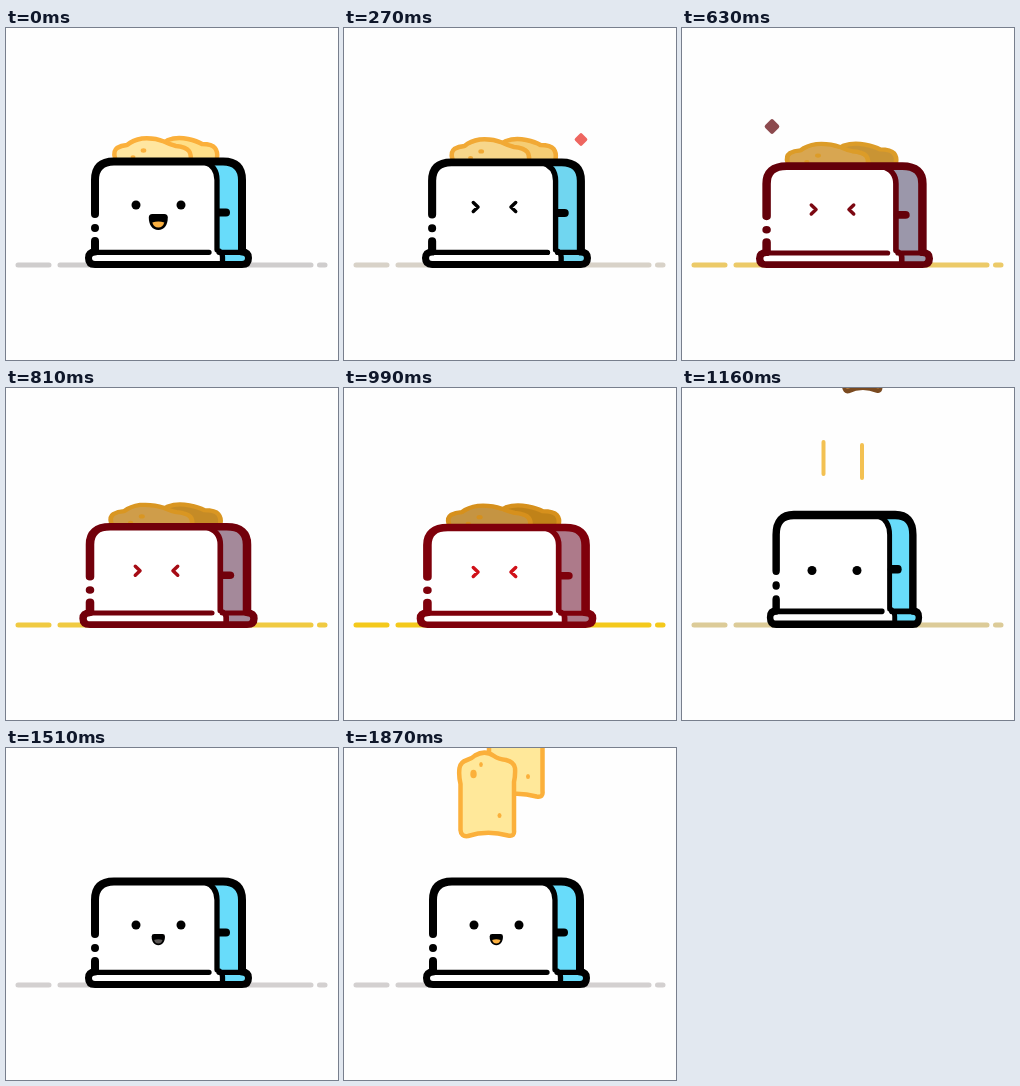
Write an HTML page that moves like this. It is 332 px wide and 332 px high and loops after 1.96 s.

```html
<!DOCTYPE html>
<html lang="en">
<head>
<meta charset="utf-8">
<title>Toaster</title>
<style>
html, body { margin: 0; width: 100%; height: 100%; overflow: hidden; background: #fefefe; }
svg { display: block; width: 100%; height: 100%; }
.line { fill: none; stroke-linecap: round; stroke-linejoin: round; }
</style>
</head>
<body>
<svg viewBox="0 0 332 332">
  <defs>
    <g id="slice">
      <path d="M116.500 82V36Q114.500 27 115.500 20Q116.500 14 123 12Q128 10.500 131 7.500Q141 1.500 150 8Q154 11 162 12Q170 14 171 20Q171.500 27 170 34V82Q171 89 164 87.500Q143 82 124 88Q117 89 116.500 82Z" stroke-width="4.500" stroke-linejoin="round"/>
      <g class="spot" stroke="none">
        <ellipse cx="129.500" cy="26" rx="3.200" ry="4.300"/>
        <ellipse cx="137" cy="16.500" rx="1.800" ry="2.500"/>
        <ellipse cx="155.500" cy="67.500" rx="2" ry="2.500"/>
      </g>
    </g>
  </defs>

  <path id="floor" class="line" stroke-width="5" d="M12 237H43M54 237H305M313.500 237H319"/>

  <g id="toast">
    <use id="back" href="#slice"/>
    <use id="front" href="#slice"/>
  </g>
  <path id="streaks" class="line" stroke="#f3c152" stroke-width="4" d="M141.500 54V86M180 57V90"/>

  <g id="body">
    <g id="crust" stroke-width="4.500" stroke-linejoin="round">
      <path id="crustBack" d="M150 136Q154 116 162 112Q171 108.500 182 111Q191 113 196 116Q206 116 209 120Q212 124 211 130V136Z"/>
      <path id="crustFront" d="M109 136V130Q107 123 111 120Q115 117.500 121 117Q127 112 136 110.500Q148 109.500 158 113.500Q165 117 170 118Q180 119 183 123Q186 127 184 136Z"/>
      <g id="crumbs" stroke="none">
        <ellipse cx="137.500" cy="122.500" rx="2.800" ry="2.200"/>
        <ellipse cx="127" cy="129" rx="2.500" ry="1.800"/>
      </g>
    </g>
    <path class="side" d="M190 133.500H217Q236 133.500 236 152V236H190Z"/>
    <path d="M89 228V152Q89 133.500 108 133.500H194Q211 134 211 152V228Z" fill="#fff"/>
    <rect x="82.500" y="223.500" width="160" height="13" rx="6.500" fill="#fff"/>
    <path class="side" d="M216 224H236Q242 225 242 230Q242 236 236 236H216Z"/>
    <g class="line ink" stroke-width="8">
      <path d="M89 186V152Q89 133.500 108 133.500H217Q236 133.500 236 152V223"/>
      <path d="M89 200V200.010M89 213V223"/>
      <path d="M89 224Q82.500 224 82.500 230Q82.500 236.500 89 236.500H236Q242.500 236.500 242.500 230Q242.500 224 236 224" stroke-width="7"/>
      <path d="M89 224.300H203M198 134Q211 138 211 152V222Q216.500 224 216.500 229V234M213 224.300H236" stroke-width="5.300"/>
      <path d="M213 184.500H220"/>
    </g>
  </g>

  <g id="face">
    <g id="dots">
      <circle cx="130" r="4.500"/>
      <circle cx="175" r="4.500"/>
    </g>
    <path id="squint" class="line" stroke-width="3.500" d="M129.300 -4.500L134 0L129.300 4.500M171.700 -4.500L167 0L171.700 4.500"/>
  </g>
  <g id="mouth">
    <path d="M-9.500 3.500Q-9.500 0 -6 0H6Q9.500 0 9.500 3.500C9.500 11 6 16 0 16S-9.500 11 -9.500 3.500Z"/>
    <path id="tongue" d="M-6 8.500Q0 6.500 6 8.500Q4.500 13.500 0 13.500T-6 8.500Z"/>
  </g>

  <rect id="gem" x="-5" y="-5" width="10" height="10" rx="1.800"/>
</svg>
<script>
const LOOP = 1960;
// moments at which the picture changes
const STEPS = [0, 90, 180, 270, 360, 450, 540, 630, 720, 810, 900, 990, 1070, 1160, 1250, 1340, 1430, 1510, 1870];
const $ = id => document.getElementById(id);
const set = (el, attrs) => { for (const k in attrs) el.setAttribute(k, attrs[k]); };
const show = (id, on) => set($(id), { visibility: on ? 'visible' : 'hidden' });
const rgb = hex => [1, 3, 5].map(i => parseInt(hex.slice(i, i + 2), 16));

// linear track through [time, value] pairs; values are numbers or hex colours
function track(t, ...keys) {
  let i = 0;
  while (i < keys.length - 1 && keys[i + 1][0] <= t) i++;
  const [t0, a] = keys[i], [t1, b] = keys[Math.min(i + 1, keys.length - 1)];
  const k = t1 > t0 ? Math.max(0, (t - t0) / (t1 - t0)) : 0;
  const mix = (x, y) => x + (y - x) * k;
  if (typeof a === 'number') return mix(a, b);
  const q = rgb(b);
  return `rgb(${rgb(a).map((x, n) => Math.round(mix(x, q[n])))})`;
}

function drawBody(t) {
  const sx = track(t, [90, 1], [270, 1.012], [630, 1.06], [990, 1.076], [1160, .93], [1250, .97], [1340, 1.015], [1430, 1]);
  const sy = track(t, [90, 1], [270, .992], [630, .957], [990, .943], [1160, 1.06], [1250, 1.025], [1340, .99], [1430, 1]);
  set($('body'), { transform: `translate(162.5 240) scale(${sx} ${sy}) translate(-162.5 -240)` });

  const ink = track(t, [270, '#000000'], [630, '#64000a'], [990, '#7f000b'], [1160, '#000000']);
  const side = track(t, [90, '#68dcfa'], [270, '#70d6f0'], [630, '#9b97aa'], [990, '#ad7a8a'], [1160, '#68dcfa']);
  document.querySelectorAll('.ink').forEach(el => set(el, { stroke: ink }));
  document.querySelectorAll('.side').forEach(el => set(el, { fill: side }));
  set($('floor'), { stroke: track(t, [90, '#cfcdcd'], [270, '#d8d2c8'], [630, '#ecca68'], [990, '#f4c91c'], [1160, '#dccb98'], [1510, '#d3d0d0']) });
}

function drawToast(t) {
  const edge = track(t, [90, '#fbb03b'], [630, '#dc9c28'], [990, '#d6901c'], [1160, '#7a4a20'], [1161, '#fbb03b']);
  const fill = track(t, [90, '#ffe6a0'], [270, '#f7d68a'], [630, '#d8a651'], [990, '#c59442'], [1160, '#b07a3c'], [1161, '#ffe89a']);
  const rear = track(t, [90, '#ffdf88'], [270, '#f5cd74'], [630, '#c99434'], [990, '#c08218']);
  set($('crust'), { stroke: edge });
  set($('crustFront'), { fill });
  set($('crustBack'), { fill: rear });
  set($('crumbs'), { fill: edge });
  show('crust', t < 1070);

  const up = t >= 1070 && t < 1250;
  const falling = t >= 1870;
  show('toast', up || falling);
  set($('toast'), { fill, stroke: edge });
  set(document.querySelector('.spot'), { fill: edge });
  const place = (id, x, y, sx) =>
    set($(id), { transform: `translate(${x} ${y}) scale(${sx} 1) translate(-143 0)` });
  if (falling) {
    place('front', 143, 0, 1);
    place('back', 171.5, -39, 1);
  } else {
    place('front', 141.5, track(t, [1070, 22], [1160, -110]), .7);
    place('back', 180, track(t, [1070, 38], [1160, -85]), .7);
  }

  show('streaks', t >= 1160 && t < 1340);
  set($('streaks'), { transform: `translate(0 ${track(t, [1160, 0], [1250, -42])})` });
}

function drawFace(t) {
  const squint = t >= 180 && t < 1160;
  const y = track(t, [90, 177], [270, 179], [630, 181.5], [990, 184], [1160, 182.5], [1430, 177]);
  set($('face'), { transform: `translate(0 ${y})` });
  show('dots', !squint);
  show('squint', squint);
  set($('squint'), { stroke: track(t, [270, '#000000'], [630, '#7c0812'], [990, '#d01018']) });

  show('mouth', t < 180 || t >= 1430);
  const size = track(t, [0, 1], [90, .7], [1430, .4], [1510, .7], [1870, .7]);
  set($('mouth'), { transform: `translate(152.3 186) scale(${size})` });
  set($('tongue'), { fill: t >= 1430 && t < 1870 ? '#5a5654' : '#fbb040' });
}

function drawGem(t) {
  const right = t < 450;
  show('gem', t >= 180 && t < 810);
  const size = right
    ? track(t, [180, .6], [270, 1], [360, .7])
    : track(t, [450, .6], [540, 1], [630, 1.15], [720, .7]);
  set($('gem'), {
    transform: `translate(${right ? '237 111.5' : '90 98.5'}) rotate(45) scale(${size})`,
    fill: track(t, [270, '#ee6660'], [630, '#8c4a4e'])
  });
}

function draw(t) {
  drawBody(t);
  drawToast(t);
  drawFace(t);
  drawGem(t);
}

const start = performance.now();
function tick() {
  const t = (performance.now() - start) % LOOP;
  draw(STEPS.filter(s => s <= t).pop());
  requestAnimationFrame(tick);
}
tick();
</script>
</body>
</html>
```
